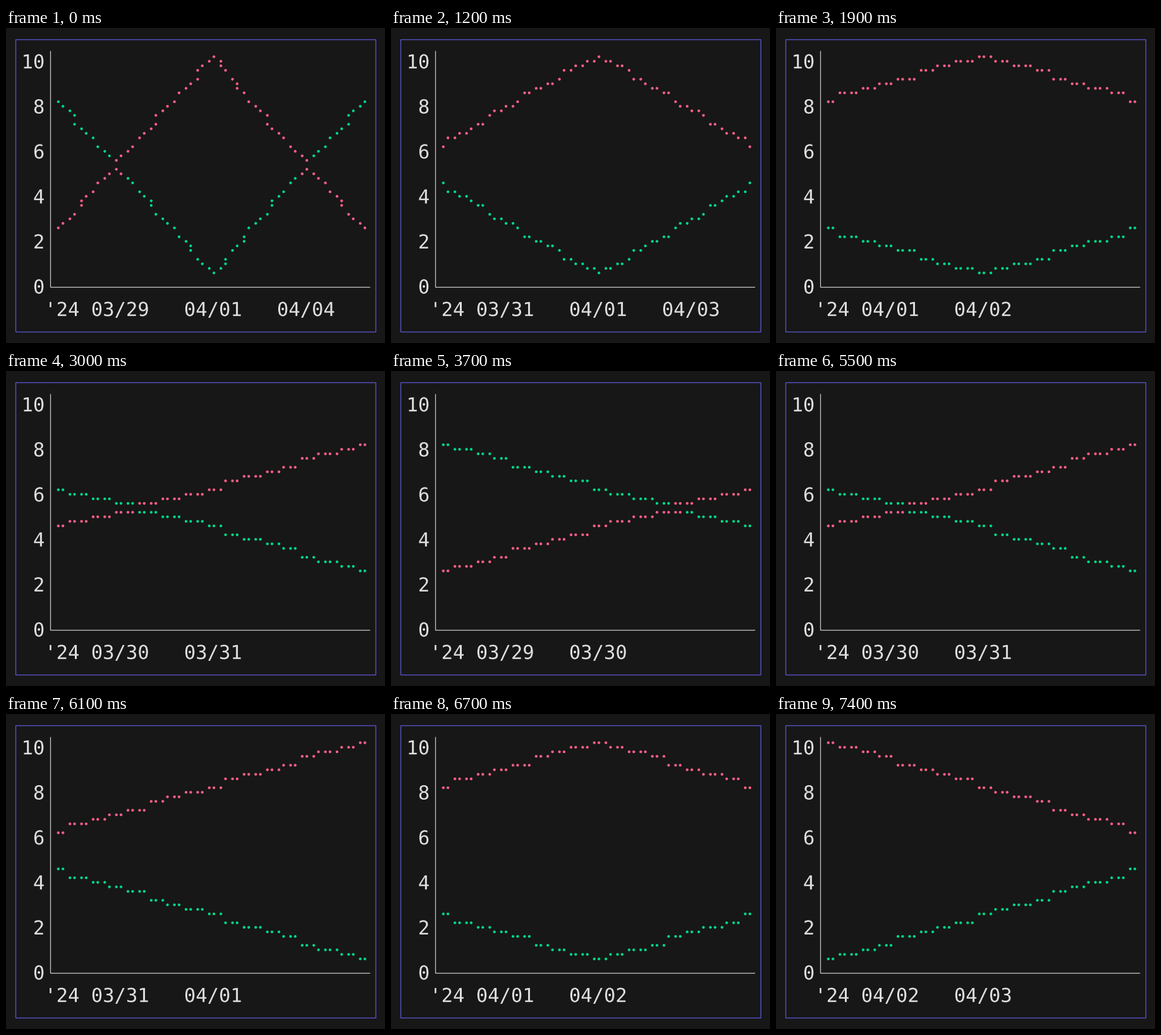
Recreate the animation shown at these times as a matplotlib script. Size 600 px wide and 500 px high, loop 8 s.

```python
import matplotlib.pyplot as plt
from matplotlib.animation import FuncAnimation
from matplotlib.patches import PathPatch, Rectangle
from matplotlib.textpath import TextPath
from matplotlib.transforms import Affine2D

W, H, DPI = 600, 500, 100
PX = 72 / DPI
CELL_W, CELL_H = 18.385, 35.73
LEFT, TOP = 15.3, 18.0
COLS, ROWS = 54, 40          # braille resolution: 27 x 10 cells of 2 x 4 dots
BG, BORDER, AXIS, INK = "#171717", "#5653c4", "#c4c4c4", "#dedede"
RED, GREEN = "#ff5f87", "#00d787"
MONO = {"family": "DejaVu Sans Mono"}
PEAK_DAY = 5                 # days are counted from 03/28

STEP_MS = 100
# (start time, first day, days shown): zoom in, pan left, pan right
VIEWS = [(0, 1, 8), (600, 2, 6), (1200, 3, 4), (1900, 4, 2), (2500, 3, 2),
         (3000, 2, 2), (3700, 1, 2), (4300, 0, 2), (4900, 1, 2),
         (5500, 2, 2), (6100, 3, 2), (6700, 4, 2), (7400, 5, 2)]
LOOP_MS = 8000

fig = plt.figure(figsize=(W / DPI, H / DPI), dpi=DPI, facecolor=BG)
ax = fig.add_axes([0, 0, 1, 1])
ax.set_xlim(0, W)
ax.set_ylim(H, 0)
ax.axis("off")


def cell_center(col, row):
    return LEFT + CELL_W * col, TOP + CELL_H * row


def put_text(text, col, row):
    x, y = cell_center(col, row)
    glyphs = TextPath((0, 0), text, size=CELL_W / 0.602, prop=MONO)
    place = Affine2D().scale(1, -1).translate(x - CELL_W / 2, y + 10.4)
    return ax.add_patch(PathPatch(place.transform_path(glyphs), fc=INK, lw=0))


def date_label(day):
    return f"03/{28 + day}" if day < 4 else f"04/{day - 3:02d}"


def red_value(day):
    return 10 - 2 * abs(day - PEAK_DAY)


def green_value(day):
    return 10 - red_value(day)


def bresenham(a0, b0, a1, b1):
    """Integer line along the a axis; ties keep the previous b."""
    da, db = a1 - a0, abs(b1 - b0)
    err, b = 2 * db - da, b0
    for a in range(a0, a1 + 1):
        yield a, b
        if err > 0:
            b += 1 if b1 > b0 else -1
            err -= 2 * da
        err += 2 * db


def line_dots(p, q):
    if abs(q[1] - p[1]) < abs(q[0] - p[0]):
        (x0, y0), (x1, y1) = sorted((p, q))
        return list(bresenham(x0, y0, x1, y1))
    (x0, y0), (x1, y1) = sorted((p, q), key=lambda point: point[1])
    return [(x, y) for y, x in bresenham(y0, x0, y1, x1)]


def chart_dots(first, span):
    """Dot positions and colours; a cell takes the colour painted last."""
    dots, cell_color = set(), {}
    for value, color in ((green_value, GREEN), (red_value, RED)):
        points = [(int(i * (COLS - 1) / span + 0.5),
                   int((10 - value(first + i)) * (ROWS - 1) / 10 + 0.5))
                  for i in range(span + 1)]
        for p, q in zip(points, points[1:]):
            for x, y in line_dots(p, q):
                dots.add((x, y))
                cell_color[x // 2, y // 4] = color
    dots = sorted(dots)
    places = [(82.8 + CELL_W * (x // 2) + 7.35 * (x % 2),
               45.6 + CELL_H * (y // 4) + 7.2 * (y % 4)) for x, y in dots]
    return places, [cell_color[x // 2, y // 4] for x, y in dots]


def axis_labels(first, span):
    count = 2 if span == 2 else 3
    return [date_label(first + i * (span + 1) // count) for i in range(count)]


# Static frame, axes and value labels
ax.add_patch(Rectangle((LEFT, TOP), 31 * CELL_W, 13 * CELL_H,
                       fill=False, ec=BORDER, lw=1.4 * PX))
axis_x, axis_y = cell_center(3, 11)
ax.plot([axis_x, axis_x, axis_x + 27.5 * CELL_W],
        [TOP + CELL_H / 2, axis_y, axis_y], color=AXIS, lw=1.3 * PX,
        solid_capstyle="butt", solid_joinstyle="miter")
for value in range(0, 11, 2):
    put_text(f"{value:2d}", 1, 11 - value)
put_text("'24", 3, 12)

dots = ax.scatter([], [], s=(4.3 * PX) ** 2, linewidths=0, zorder=3)
labels = []


def draw(frame):
    now = frame * STEP_MS
    _, first, span = [view for view in VIEWS if view[0] <= now][-1]
    places, colors = chart_dots(first, span)
    dots.set_offsets(places)
    dots.set_facecolors(colors)
    while labels:
        labels.pop().remove()
    for i, text in enumerate(axis_labels(first, span)):
        labels.append(put_text(text, 7 + 8 * i, 12))
    return [dots, *labels]


anim = FuncAnimation(fig, draw, frames=LOOP_MS // STEP_MS, interval=STEP_MS,
                     repeat=True, repeat_delay=0, blit=False)
plt.show()
```
